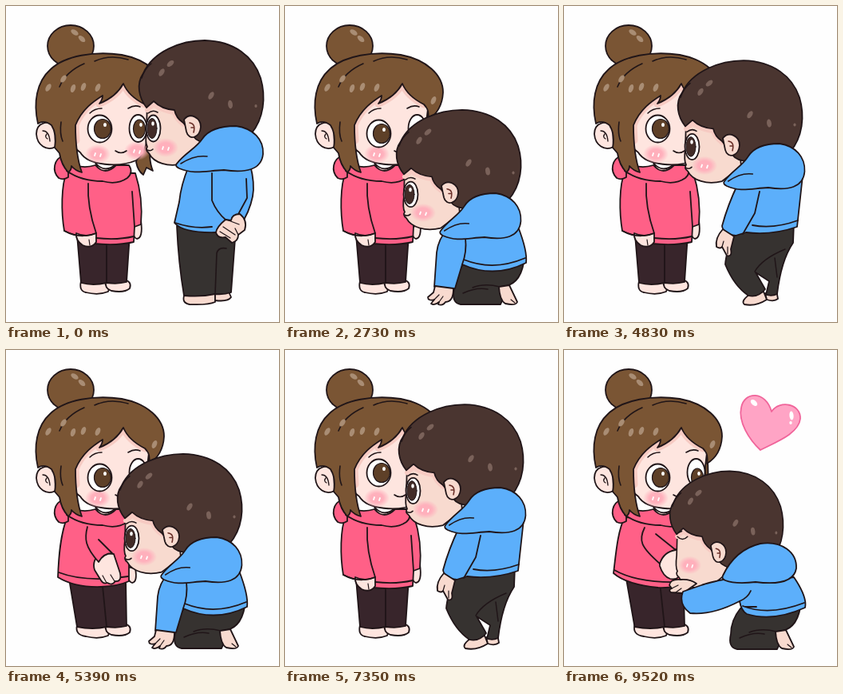
An HTML page that plays this animation: 342 by 395 pixels, repeating every 9590 ms.

```html
<!DOCTYPE html>
<html lang="en">
<head>
<meta charset="utf-8">
<title>Hand kiss</title>
<style>
html, body { margin: 0; width: 100%; height: 100%; overflow: hidden; background: #fefefe; }
svg { display: block; width: 100vw; height: 100vh; }
</style>
</head>
<body>
<svg id="stage" viewBox="0 0 342 395" fill="none" stroke="#201518" stroke-width="1.8" stroke-linecap="round" stroke-linejoin="round"></svg>
<script>
const C = {
  skin: '#fee5df', tan: '#f8dacf', brown: '#7a5534', dark: '#4a3530',
  pink: '#ff6087', blue: '#5caffb', plum: '#38252b', coal: '#363230',
  eye: '#5e4028', shade: '#f7cbc3'
};

const path = (d, fill = 'none', more = '') => `<path d="${d}" fill="${fill}" ${more}/>`;
const oval = (x, y, rx, ry, fill, turn = 0, more = 'stroke="none"') =>
  `<ellipse cx="${x}" cy="${y}" rx="${rx}" ry="${ry}" fill="${fill}" transform="rotate(${turn} ${x} ${y})" ${more}/>`;
const group = (id, body, hidden = true) => `<g id="${id}"${hidden ? ' display="none"' : ''}>${body}</g>`;
const moved = (body, change) => `<g transform="${change}">${body}</g>`;
const shine = (list, fill) => list.map(([x, y, turn]) => oval(x, y, 2.9, 5.2, fill, turn)).join('');

const blush = `<defs><radialGradient id="blush">
  <stop offset=".5" stop-color="#ffb0bc"/><stop offset="1" stop-color="#ffb0bc" stop-opacity="0"/>
</radialGradient></defs>`;

function cheek(x, y) {
  return oval(x, y, 16, 12, 'url(#blush)') +
    path(`M${x - 3} ${y - 1}l-1 3M${x + 4} ${y}l-1 3`, 'none', 'stroke="#fff"');
}

function girlEyes(dy) {
  const y = 153.5 + dy;
  return oval(117.5, y, 15, 17, '#fff', 0, '') + oval(121, y, 10.5, 12, C.eye, 0, 'stroke-width="1.2"') +
    oval(124, y - 5, 2, 2.5, '#fff') +
    oval(165.5, 153, 11, 17, '#fff', 0, '') + oval(167, y, 7.5, 11.5, C.eye, 0, 'stroke-width="1.2"') +
    oval(169, y - 5, 1.8, 2.4, '#fff');
}

function girlHead() {
  const fringe = '174 123C162 117 152 109 147 97C141 108 132 116 117 122Q121 117 121 112C110 119 95 129 87 149C87 172 90 194 95 208';
  return oval(81, 50, 29, 26, C.brown, 0, '') +
    shine([[86, 33, -58], [95, 41, -48]], '#a98d74') +
    path('M178 125C185 158 175 185 184 206L176 202 172 211Q165 206 163 195L170 168Z', C.brown) +
    path('M61 150C55 142 38 145 38 160C39 174 51 182 62 176Z', C.skin) +
    path('M46 156Q54 156 55 169M51 160Q48 164 52 166', 'none', 'stroke-width="1.3"') +
    path('M80 125C78 155 82 177 93 183C103 200 142 202 163 193C177 184 177 165 177 145L180 120 148 88 115 96Z', C.skin) +
    path('M' + fringe.split('C87 172')[0] + 'L88 168', 'none', `stroke="${C.shade}" stroke-width="9"`) +
    cheek(115, 185) + cheek(164, 181) +
    group('eyesLevel', girlEyes(0), false) + group('eyesDown', girlEyes(6)) +
    path('M137 181Q144 186 151 181', 'none', 'stroke-width="1.6"') +
    path('M105 134Q111 128 120 128M153 128Q161 123 168 126', 'none', 'stroke-width="1.6"') +
    path(`M40 147C34 121 38 95 56 79C74 62 111 56 145 61C177 67 198 86 198 108C197 127 189 136 179 142C181 133 179 128 ${fringe}Q87 206 82 200Q82 205 78 208Q69 198 67 184L61 177Q64 160 57 149Q48 142 40 147Z`, C.brown) +
    path('M67 101Q75 82 98 72M111 69Q130 60 153 67M69 145Q67 160 71 169', 'none', 'stroke-width="1.6"') +
    shine([[53, 102, 32], [84, 103, 20], [97, 101, 22], [115, 102, 25], [72, 91, 35], [186, 118, 25]], '#a98d74');
}

function girlLegs(shift) {
  const foot = 94 - shift / 2;
  return path(`M${foot} 344Q${foot - 3} 356 100 358Q116 362 128 357Q131 350 125 344Z`, C.skin) +
    path('M125 343Q123 353 132 356Q148 359 155 353Q158 345 149 342Z', C.skin) +
    path(`M${89 - shift} 286L${foot} 346Q109 350 126 346Q140 348 151 345L${155 - shift / 2} 286Z`, C.plum) +
    path(`M${126 - shift / 2} 295L126 346`);
}

function hood() {
  return path('M72 187C60 191 57 206 66 215Q72 218 78 214L78 190Z', C.pink) +
    path('M112 196Q124 211 140 196L142 207 119 211Z', C.skin) +
    path('M76 194Q93 205 112 199Q124 213 138 199L154 199Q160 208 152 215Q139 224 121 219Q94 219 76 206Z', C.pink);
}

const girlBody = {
  down: () => girlLegs(0) +
    path('M160 268Q157 289 164 291Q172 290 169 268Z', C.skin) +
    path('M76 208C69 224 69 258 73 281Q85 287 96 287L110 297Q138 300 160 295L161 276 169 273Q172 240 162 209Z', C.pink) +
    path('M88 284Q87 293 96 299Q107 304 113 295L113 284Q100 290 88 284Z', C.skin) +
    path('M104 292L105 299', 'none', 'stroke-width="1.2"') +
    path('M73 281Q92 292 113 284C106 264 102 242 103 222M113 290Q139 293 160 288M161 276L158 232') + hood(),
  reach: () => girlLegs(10) +
    path('M152 271Q151 289 158 291Q165 290 162 273Z', C.skin) +
    path('M77 208C68 230 66 258 65 284Q86 297 119 296Q141 295 154 289L154 208Z', C.pink) +
    path('M66 278Q100 291 153 283') +
    path('M119 253Q107 263 111 275L119 288Q122 293 127 291Q133 295 137 289Q145 290 143 279L135 255Z', C.skin) +
    path('M121 282L126 291M131 281L136 289', 'none', 'stroke-width="1.2"') +
    path('M102 221C98 236 99 246 116 265Q122 254 133 254L116 237', C.pink) + hood(),
  kiss: () => girlLegs(11) +
    path('M76 209C67 227 65 255 62 279Q78 293 118 297Q140 298 154 290L148 210Z', C.pink) +
    path('M63 275Q91 291 141 290') +
    path('M128 250Q118 259 120 270Q124 283 133 286Q144 289 149 275L146 249Z', C.skin) +
    path('M101 222C93 238 96 246 120 267Q125 252 140 250L115 230', C.pink) + hood()
};

// Head in its upright place; each pose moves it.
function boyHead(asleep) {
  const eye = asleep
    ? path('M177 130Q184 137 191 130M178 125l5 -2', 'none', 'stroke-width="1.6"')
    : oval(184.5, 153, 9, 16.5, '#fff', 0, '') + oval(183, 153, 6, 12.5, '#422c28', 0, 'stroke-width="1"') +
      oval(184, 147, 1.8, 2.8, '#fff');
  return path('M177 118L176 155Q174 171 177 176Q174 180 179 184C185 196 203 202 222 197L246 178 240 118Z', C.tan) +
    path('M177 130L185 123Q196 131 211 133Q213 141 222 148', 'none', `stroke="${C.shade}" stroke-width="6"`) +
    cheek(asleep ? 194 : 200, asleep ? 168 : 177) + eye +
    (asleep ? '' : path('M178 134Q184 129 190 133M177 180Q181 182 184 179', 'none', 'stroke-width="1.6"')) +
    path('M176 127C166 114 163 97 172 84C184 57 219 43 249 43C286 44 310 63 319 90C326 114 323 141 307 160L249 171Q236 169 232 158L222 146Q213 140 211 130Q195 129 185 119Z', C.dark) +
    path('M223 142C231 132 244 140 244 151C243 165 229 169 226 157Z', C.tan) +
    path('M230 146Q238 147 235 158M232 152l3 0', 'none', 'stroke="#6b2f28" stroke-width="1.6"') +
    path('M170 90Q174 78 182 72', 'none', 'stroke-width="1.5"') +
    shine([[206, 72, 50], [195, 83, 32], [257, 112, 32], [281, 123, -8]], '#7a625a') +
    oval(313, 125, 1.6, 2, '#7a625a');
}

const boyHood = path('M214 197C224 184 238 178 246 166C254 154 271 150 288 150C310 153 323 167 322 185C320 205 300 209 273 205C250 206 236 211 217 203Q211 200 214 197Z', C.blue) +
  path('M219 197Q236 186 252 188', 'none', 'stroke-width="1.6"');

const foldedLegs =
  path('M224 322Q212 337 212 354Q208 371 220 373L270 373Q276 363 270 351Q294 350 299 321Z', C.coal) +
  path('M235 352Q250 346 269 351M223 359Q240 351 254 354', 'none', 'stroke-width="1.5"') +
  path('M268 351Q269 368 276 372Q289 375 291 370L281 349Z', C.tan) +
  path('M283 367l5 4', 'none', 'stroke-width="1.2"');

const boy = {
  stand: () =>
    path('M224 360Q219 371 230 373Q253 374 262 370L262 359Z', C.tan) +
    path('M262 357L262 368Q278 370 282 364L278 355Z', C.tan) +
    path('M214 275Q216 321 223 362Q244 364 262 360Q273 361 282 358Q285 320 288 278Z', C.coal) +
    path('M276 303Q266 301 264 309L262 360', 'none', 'stroke-width="1.6"') +
    path('M229 200Q219 224 217 245L211 271Q222 284 263 283L293 275Q305 258 309 238Q312 222 306 199Z', C.blue) +
    path('M258 209L258 243Q264 258 276 268M212 271Q235 279 258 276M301 216L302 240 290 262') +
    path('M275 267Q264 276 263 283Q265 291 275 289L283 296Q291 294 291 286L299 280Q303 268 293 260Q283 260 282 268Z', C.tan) +
    path('M276 267L292 273M272 276L287 286M268 282L281 290M291 286L287 278', 'none', 'stroke-width="1.3"') +
    boyHead() + boyHood,
  bend: () =>
    path('M232 361Q221 369 226 373Q240 376 254 367L250 357Z', C.tan) +
    path('M252 359L254 367Q263 370 268 366L266 355Z', C.tan) +
    path('M215 278Q203 307 202 323Q213 350 231 362Q243 365 252 354L240 333 257 344 253 361Q261 363 267 360Q272 318 287 296L288 271Z', C.coal) +
    path('M277 304Q248 316 239 332M264 315L267 339', 'none', 'stroke-width="1.5"') +
    path('M218 222Q205 249 198 275Q199 284 215 287L228 283Q260 287 292 276L299 212Z', C.blue) +
    path('M245 232L239 259 224 285M236 274Q263 279 293 268') +
    path('M199 279Q189 290 191 301Q196 304 198 301L204 312Q211 314 209 304L213 288Z', C.tan) +
    path('M198 301L200 294M205 310L205 301', 'none', 'stroke-width="1.2"') +
    moved(boyHead(), 'translate(-24 26) scale(1 .98)') + moved(boyHood, 'translate(2 22) scale(.93 1)'),
  kneel: () => foldedLegs +
    path('M204 278Q192 291 190 308L187 351Q200 356 213 353L222 323Q262 341 302 321Q304 307 292 276Z', C.blue) +
    path('M226 290Q228 307 222 323M224 317Q261 332 301 315') +
    path('M188 350L186 358 179 364Q179 369 187 367L183 372Q187 375 193 370L192 373Q198 375 201 370Q211 370 211 353Z', C.tan) +
    path('M187 367L193 361M193 370L198 363', 'none', 'stroke-width="1.2"') +
    moved(boyHead(), 'translate(-27 88.5) scale(1 .96)') + moved(boyHood, 'translate(-4 84) scale(.93 1)'),
  kiss: () => moved(foldedLegs, 'translate(-3 1)') +
    moved(boyHead(true), 'translate(-19 111) scale(.91 .94)') +
    path('M146 287Q133 286 132 294L135 298Q130 300 134 303L149 304 166 292Q158 286 146 287Z', C.tan) +
    path('M135 298L143 294M140 303L147 298', 'none', 'stroke-width="1.2"') +
    path('M204 286Q180 291 172 294L149 302Q143 318 158 329Q185 332 220 314Q222 326 229 330Q262 340 302 322Q305 309 288 284Z', C.blue) +
    path('M220 314Q230 310 234 301M224 320Q257 333 301 316M227 321L241 321') +
    path('M199 282C209 261 225 247 246 242C273 238 292 253 291 273C288 291 264 293 240 290Q215 293 202 288Q197 286 199 282Z', C.blue)
};

const heart =
  path('M0 0C-14 -13 -28 -35 -24 -53C-20 -74 7 -74 14 -48C24 -63 51 -58 50 -39C48 -21 22 -11 0 0Z', '#ffa4c5', 'stroke="#f0649a"') +
  oval(39, -43, 2.6, 5.5, '#fff', -5) + oval(-8, -59, 3, 5, '#fff', -48) + oval(38, -34, 1.7, 2, '#fff');

const stage = document.getElementById('stage');
stage.innerHTML = blush +
  Object.keys(girlBody).map(k => group('girl-' + k, girlBody[k]())).join('') + girlHead() +
  Object.keys(boy).map(k => group('boy-' + k, boy[k]())).join('') + group('heart', heart);

const show = (id, on) => document.getElementById(id).setAttribute('display', on ? 'inline' : 'none');

const LOOP = 9590, STEP = 70;
const starts = [0, 2240, 4760, 7280];
// Start time within a round, boy, girl.
const poses = [
  [0, 'stand', 'down'], [70, 'bend', 'down'], [350, 'kneel', 'down'],
  [560, 'kneel', 'reach'], [910, 'kiss', 'kiss']
];

function draw(time) {
  const t = Math.floor((time % LOOP) / STEP) * STEP;
  const phase = t - starts.filter(s => s <= t).pop();
  const [, him, her] = poses.filter(p => p[0] <= phase).pop();
  for (const k in boy) show('boy-' + k, k === him);
  for (const k in girlBody) show('girl-' + k, k === her);
  const level = him === 'stand' || him === 'bend';
  show('eyesLevel', level);
  show('eyesDown', !level);

  const u = Math.min(1, (phase - 1540) / 700);
  show('heart', u > 0);
  if (u > 0) {
    const e = 1 - (1 - u) ** 2;
    document.getElementById('heart').setAttribute('transform',
      `translate(${233.8 + 12.2 * e} ${155.6 - 30.6 * e}) scale(${0.35 + 0.65 * e})`);
  }
}

let begin;
function tick(now) {
  begin ??= now;
  draw(now - begin);
  requestAnimationFrame(tick);
}
draw(0);
requestAnimationFrame(tick);
</script>
</body>
</html>
```
